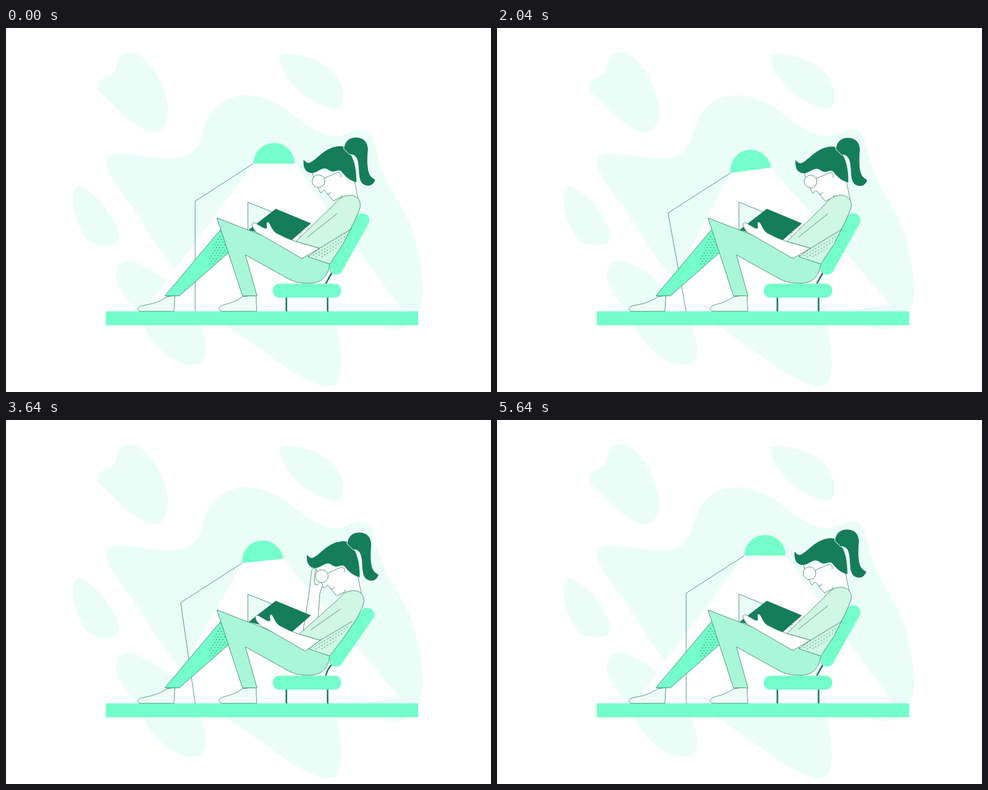
These frames come from a looping animation (800x600 px, 5760 ms). An HTML page:

```html
<!DOCTYPE html>
<html lang="en">
<head>
<meta charset="utf-8">
<title>Reading under a lamp</title>
<style>
  html, body { margin: 0; width: 100%; height: 100%; overflow: hidden; background: #fff; }
  svg { display: block; width: 100vw; height: 100vh; }
  .pale { fill: #eafef7; }
  .shoe { fill: #effdf8; }
  .mint { fill: #74fecb; }
  .dark { fill: #157d5a; }
  .white { fill: #fff; }
  .none { fill: none; }
  .line { stroke: #2f7d66; stroke-width: .8; stroke-linejoin: round; }
  .steel { fill: none; stroke: #157d5a; stroke-width: 2.6; }
</style>
</head>
<body>
<svg viewBox="0 0 800 600">
  <defs>
    <pattern id="dots" width="5.4" height="9" patternUnits="userSpaceOnUse">
      <circle class="dark" cx="1.4" cy="2" r=".8"/>
      <circle class="dark" cx="4.1" cy="6.5" r=".8"/>
    </pattern>
    <pattern id="slantedDots" href="#dots" patternTransform="rotate(-31)"/>
    <clipPath id="aboveFloor"><path d="M0 0H800V478H0Z"/></clipPath>
  </defs>

  <g class="pale">
    <path d="M152 92C156 80 175 82 181 68C184 54 186 40 203 40C232 41 262 90 267 130C268 158 259 172 243 172C220 170 190 140 165 115C155 106 149 101 152 92Z"/>
    <path d="M451 46C456 41 480 43 500 49C530 60 553 80 556 105C557 122 554 134 543 133C525 130 495 118 475 95C462 78 450 62 451 46Z"/>
    <path d="M110 275C112 260 120 259 127 263C150 275 175 305 186 335C190 352 182 358 165 358C148 358 138 355 128 340C116 320 108 295 110 275Z"/>
    <path d="M181 405C182 388 195 382 208 384C245 395 285 430 305 465C322 490 330 510 330 535C329 553 318 556 303 555C274 553 246 528 228 493C214 462 180 430 181 405Z"/>
    <path d="M165 222C165 205 185 205 205 208C250 214 285 222 306 205C328 186 322 160 338 140C354 118 375 111 397 111C440 112 465 138 490 155C508 168 530 181 550 178C566 174 578 165 592 168C606 172 608 195 614 215C622 245 640 275 655 300C675 335 684 380 687 420C690 445 684 470 668 486C655 498 635 498 618 493C600 487 575 472 555 474C543 478 545 490 547 505C553 530 554 560 549 579C545 592 532 592 516 588C484 578 457 554 427 534C402 517 380 503 362 490L280 400C255 370 235 335 215 305C195 275 168 245 165 222Z"/>
  </g>

  <path id="cone" class="white" clip-path="url(#aboveFloor)"/>
  <path id="pole" class="none line"/>
  <path id="shade" class="mint"/>

  <path class="mint" d="M164.500 467H680V490H164.500Z"/>
  <path class="steel" d="M462.500 444V467M530.500 444V467"/>
  <path id="post" class="steel"/>
  <path id="chairBack" fill="none" stroke="#74fecb" stroke-width="23" stroke-linecap="round"/>
  <rect class="mint" x="440" y="421.500" width="113" height="23" rx="11"/>

  <path class="shoe line" d="M265 443C257 449 248 452.500 238 455L224 458C216 460 216 466 222 467H277L278.500 441Z"/>
  <path class="mint line" d="M355 331L262 441.500H286L372 366Z"/>
  <path fill="url(#dots)" d="M352 334L346 352L335 378V397L366 369Z"/>

  <g id="farArm"><path class="white line" d="M-12 4L-7 -55C-6 -68 -6 -80 -5 -95C-4 -102 1 -101 1 -95L0 -84L2 -73C7 -71 10 -76 12 -82C14 -86 17 -84 16 -79L11 -58L11 0" vector-effect="non-scaling-stroke"/></g>

  <g id="head">
    <path class="white" d="M506 236L510 262L519 272L525 267L540 285L555 278L560 300L583 292L575 240Z"/>
    <path class="none line" d="M505 238L508 246M514 262L519 272L525 267L540 285L554 278V275M574 248L582 288M530 274Q535 274 536 270"/>
    <path class="dark" d="M491 217C495 222 498 224 503 221C518 212 525 198 548 195C555 194 560 197 563 201C574 213 578 230 578 254C571 253 563 248 556 240C550 231 547 236 540 236.500C533 237 531 231 525 231.500C518 232 514 238 505 239C496 239 489 232 491 217Z"/>
    <path class="dark" stroke="#fff" stroke-width="1" d="M557 199C558 188 565 180 577 180C590 180 597 188 597.500 200C596 215 596 232 600 241C603 247 607 248 609.500 250C606 261 596 263 588 257C580 250 583 235 580 220C578 211 573 208 567 209Z"/>
    <path id="temple" class="none line"/>
    <circle id="lens" class="white line" r="10.500"/>
  </g>

  <g id="foot"><path class="shoe line" d="M390 443C382 449 372 453 357 457C350 460 350 466 357 467H413.500L412.500 440Z"/></g>
  <path fill="#a9f6d8" class="line" d="M348 313L390 441.500H414L395 374L466 413.500C482 422 505 423 518 417C530 409 533 398 534 389L500 376L418 340Z"/>

  <path id="page" class="pale line"/>
  <path id="book" class="dark"/>
  <path id="cuff" class="white line"/>
  <path id="shirt" class="line" fill="#d0f6e4"/>
  <path id="belly" fill="url(#slantedDots)"/>
  <path id="fold" class="none line"/>
  <path id="nearArm" class="white line"/>
</svg>

<script>
  const LOOP = 5760, STEP = 40, LAST = 5640;
  const el = id => document.getElementById(id);
  const setPath = (id, d) => el(id).setAttribute('d', d);
  const move = (id, value) => el(id).setAttribute('transform', value);
  const mix = (a, b, k) => a + (b - a) * k;
  const pt = (x, y, dx = 0, dy = 0) => `${(x + dx).toFixed(2)} ${(y + dy).toFixed(2)}`;
  const between = (a, b, k) => pt(mix(a[0], b[0], k), mix(a[1], b[1], k));

  // Eased value through [time, value] pairs.
  function track(t, keys) {
    if (t <= keys[0][0]) return keys[0][1];
    for (let i = 1; i < keys.length; i++) {
      const [t0, v0] = keys[i - 1], [t1, v1] = keys[i];
      if (t <= t1) {
        const k = (t - t0) / (t1 - t0);
        return mix(v0, v1, k * k * (3 - 2 * k));
      }
    }
    return keys[keys.length - 1][1];
  }

  const pulse = (t, a, b, c, d, peak = 1) => track(t, [[a, 0], [b, peak], [c, peak], [d, 0]]);

  function drawLamp(bend) {
    const left = between([408, 223.5], [385, 239], bend);
    const right = between([476, 223.5], [452, 230], bend);
    const elbow = between([312, 285.5], [282, 305], bend);
    const farRight = between([655, 467], [650, 457], bend);
    const farLeft = between([227, 467], [245, 505], bend);
    setPath('pole', `M312 467L${elbow}L${left}`);
    setPath('shade', `M${left}A33.5 33.5 0 0 1 ${right}Z`);
    setPath('cone', `M${left}L${right}L${farRight}L${farLeft}Z`);
  }

  function drawChair(lean) {
    const top = between([588, 317], [596, 321], lean);
    setPath('chairBack', `M${top}L${pt(544.5, 395)}`);
    setPath('post', `M539 401Q${between([533, 411], [529, 412], lean)} 527.5 421.5`);
  }

  function drawBook(tilt) {
    const top = pt(445, 298, 6 * tilt, 7 * tilt);
    const right = pt(503, 322, 5 * tilt, 7 * tilt);
    const bottom = pt(471, 350, 5 * tilt, 3 * tilt);
    setPath('page', `M399 333V287L${pt(441, 304, 7 * tilt, 2 * tilt)}`);
    setPath('book', `M400 333L${top}L${right}L${bottom}Z`);
  }

  function drawTorso(lean, armX, armY) {
    const up = (x, y) => pt(x, y, 6 * lean, 5.5 * lean);
    const arm = (x, y) => pt(x, y, armX, armY);
    const low = (x, y) => pt(x, y, armX * .2, armY * .2);
    setPath('shirt', `M${up(556, 278)}C${up(574, 271)} ${up(587, 281)} ${up(584, 296)}` +
      `C${up(582, 304)} ${up(578, 310)} ${up(575, 318)}L${pt(556, 356, 2 * lean, 1.5 * lean)}L534 389` +
      `L${low(498, 377)}L${low(517, 363)}L${arm(478, 352)}L${up(540, 292)}` +
      `C${up(545, 286)} ${up(549, 281)} ${up(556, 278)}Z`);
    setPath('belly', `M${arm(498, 376)}L${low(517, 364)}L${pt(566, 335, 2 * lean, lean)}L556 352L537 371L518 379Z`);
    setPath('fold', `M${up(546, 306)}L${pt(497, 345, armX, armY)}M${low(517, 363)}L${pt(570, 331, lean, lean)}`);
    setPath('nearArm', `M${low(517, 363)}L${arm(478, 352)}L${arm(462, 346)}L${arm(446, 338)}` +
      `C${arm(440, 334)} ${arm(438, 328)} ${arm(434, 321)}C${arm(430, 318)} ${arm(429, 321)} ${arm(430, 327)}` +
      `C${arm(431, 331)} ${arm(428, 331)} ${arm(424, 329)}L${arm(412, 322)}C${arm(407, 319)} ${arm(404, 323)} ${arm(407, 328)}` +
      `C${arm(409, 334)} ${arm(415, 339)} ${arm(424, 343)}L${arm(488, 380)}Z`);
  }

  function drawFarArm(t, lean) {
    const angle = track(t, [[2350, -78], [3220, 4], [4950, 4], [5500, -78]]);
    const raise = (angle + 78) / 82;
    const x = 498 + lean * 4.5, y = 341 + lean * 3 - (1 - raise) * 8;
    move('farArm', `translate(${x} ${y}) rotate(${angle}) scale(${mix(.65, 1, raise)})`);
    setPath('cuff', raise < .9 ? 'M497 329L507 334L491 348L484 342' : '');
  }

  function drawHead(bend, lean, slip) {
    move('head', `translate(${1.6 * bend + 4.2 * lean} ${.6 * bend + 4.5 * lean})`);
    const lensX = 515.5 - 2 * slip, lensY = 252.5 + 4.2 * slip;
    el('lens').setAttribute('cx', lensX);
    el('lens').setAttribute('cy', lensY);
    setPath('temple', `M${pt(lensX, lensY, 9, -5)}L546 238.5C551 236 554 241 552.5 246`);
  }

  function draw(t) {
    const bend = pulse(t, 400, 2080, 3000, 5200);
    const lean = pulse(t, 2900, 3560, 4050, 4980);
    const tilt = pulse(t, 450, 1000, 1150, 1800);
    const slip = pulse(t, 2150, 2700, 2950, 3250);
    const toe = pulse(t, 450, 950, 1150, 1700, 5) + pulse(t, 4300, 4700, 4800, 5200, 2.3);
    drawLamp(bend);
    drawChair(lean);
    drawBook(tilt);
    drawTorso(lean, 7 * tilt + 5.5 * lean, 3 * tilt + lean);
    drawFarArm(t, lean);
    drawHead(bend, lean, slip);
    move('foot', `rotate(${toe} 413 467)`);
  }

  const start = performance.now();
  function tick() {
    const t = (performance.now() - start) % LOOP;
    draw(Math.min(Math.floor(t / STEP) * STEP, LAST));
    requestAnimationFrame(tick);
  }
  tick();
</script>
</body>
</html>
```
